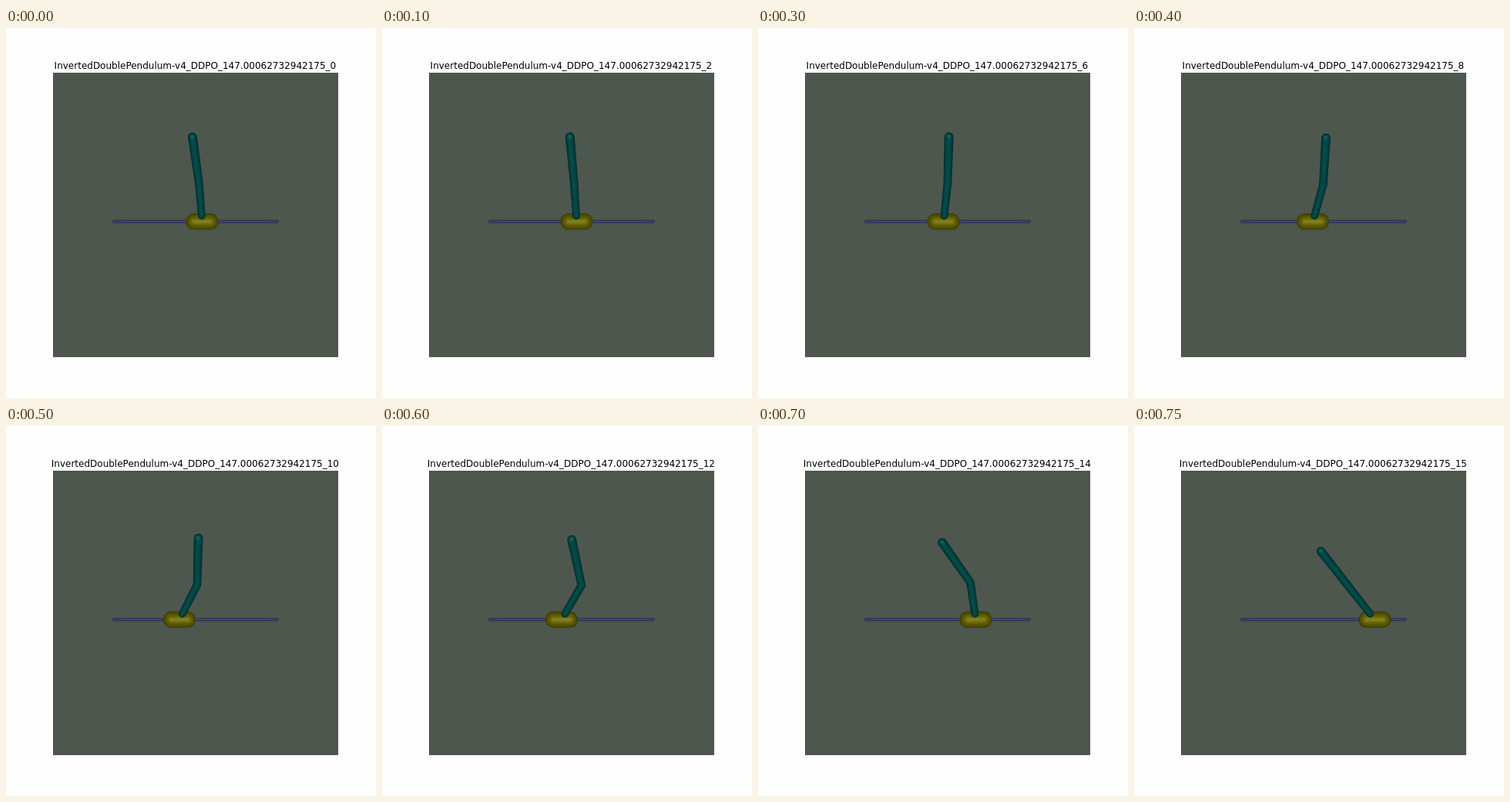
An HTML page with a canvas for the animation above (800 ms loop, 480 by 480 pixels).

```html
<!DOCTYPE html>
<html>
<head>
<meta charset="utf-8">
<style>
  html, body { margin: 0; width: 100%; height: 100%; overflow: hidden; background: #fefefe; }
  canvas { display: block; width: 480px; height: 480px; }
</style>
</head>
<body>
<canvas id="stage" width="480" height="480"></canvas>
<script>
const ctx = document.getElementById('stage').getContext('2d');
const STEP_MS = 50, STEPS = 16;
const POLE = 0.6, POLE_RADIUS = 0.045, CART_RADIUS = 0.1;

// Key poses: step, cart position, lower and upper pole angle from vertical
const POSES = [
  [0, 0.080, -0.070, -0.114],
  [4, 0.024, -0.014, -0.027],
  [8, -0.132, 0.212, 0.048],
  [10, -0.198, 0.367, 0.016],
  [11, -0.208, 0.420, -0.060],
  [12, -0.123, 0.400, -0.183],
  [14, 0.345, -0.157, -0.533],
  [15, 0.627, -0.577, -0.577]
];

// Camera looking down at 45 degrees, 45 degree field of view
function project(x, z) {
  const up = (z - 0.1225) * Math.SQRT1_2;
  const scale = 445.4 / (4.1225 - up);
  return { x: 246 + x * scale, y: 242 - up * scale, scale };
}

function slope(i, k) {
  const secant = j => (POSES[j + 1][k] - POSES[j][k]) / (POSES[j + 1][0] - POSES[j][0]);
  if (i === 0) return secant(0) * 0.5;
  if (i === POSES.length - 1) return secant(i - 1);
  const before = POSES[i][0] - POSES[i - 1][0];
  const after = POSES[i + 1][0] - POSES[i][0];
  return (secant(i - 1) * after + secant(i) * before) / (before + after);
}

// Cubic Hermite interpolation through the key poses
function poseAt(step) {
  let i = 0;
  while (i < POSES.length - 2 && step >= POSES[i + 1][0]) i++;
  const p = POSES[i], q = POSES[i + 1];
  const h = q[0] - p[0], u = (step - p[0]) / h;
  const ease = u * u * (3 - 2 * u);
  return [1, 2, 3].map(k =>
    p[k] + (q[k] - p[k]) * ease +
    h * u * (1 - u) * ((1 - u) * slope(i, k) - u * slope(i + 1, k)));
}

function bar(x1, x2, y, radius, color) {
  ctx.fillStyle = color;
  ctx.beginPath();
  ctx.roundRect(x1 - radius, y - radius, x2 - x1 + 2 * radius, 2 * radius, radius);
  ctx.fill();
}

// Capsule whose radius follows the perspective scale at each end
function capsule(a, b, size, shift) {
  const ra = a.scale * size, rb = b.scale * size;
  const angle = Math.atan2(b.y - a.y, b.x - a.x), quarter = Math.PI / 2;
  ctx.beginPath();
  ctx.arc(a.x - shift, a.y, ra, angle + quarter, angle - quarter);
  ctx.arc(b.x - shift, b.y, rb, angle - quarter, angle + quarter);
  ctx.fill();
}

function drawRail() {
  const left = project(-1, 0), right = project(1, 0);
  bar(left.x, right.x, left.y, 2.1, '#2f2e4c');
  bar(left.x, right.x, left.y, 1.2, '#403e70');
  bar(left.x + 10, right.x - 10, left.y - 0.2, 0.6, '#49477c');
}

function drawCart(x) {
  const c = project(x, 0), half = CART_RADIUS * c.scale;
  const layers = [
    [1, '#3b3b08'], [0.92, '#474700'], [0.8, '#525100'],
    [0.64, '#5c5b00'], [0.46, '#676600'], [0.29, '#73720c'], [0.19, '#7f7e20']
  ];
  for (const [size, color] of layers)
    bar(c.x - half, c.x + half, c.y, half * size, color);
}

function drawPoles(x, lower, upper) {
  const elbowX = x + POLE * Math.sin(lower), elbowZ = POLE * Math.cos(lower);
  const base = project(x + CART_RADIUS * Math.tan(lower), CART_RADIUS);
  const elbow = project(elbowX, elbowZ);
  const tip = project(elbowX + POLE * Math.sin(upper), elbowZ + POLE * Math.cos(upper));
  const layers = [
    [1, 0, '#042b2a'], [0.86, 0.1, '#003735'], [0.68, 0.2, '#00413f'],
    [0.46, 0.3, '#004846'], [0.22, 0.4, '#004e4b']
  ];
  for (const [size, shift, color] of layers) {
    ctx.fillStyle = color;
    capsule(base, elbow, POLE_RADIUS * size, shift);
    capsule(elbow, tip, POLE_RADIUS * size, shift);
  }
  const glow = ctx.createRadialGradient(tip.x - 0.3, tip.y - 0.5, 0, tip.x - 0.3, tip.y - 0.5, 4.2);
  glow.addColorStop(0, 'rgba(28,122,116,0.9)');
  glow.addColorStop(1, 'rgba(0,82,78,0)');
  ctx.fillStyle = glow;
  ctx.fillRect(tip.x - 5, tip.y - 5, 10, 10);
}

function draw(step) {
  ctx.fillStyle = '#fefefe';
  ctx.fillRect(0, 0, 480, 480);
  ctx.fillStyle = '#4e574e';
  ctx.fillRect(61, 58, 370, 369);

  ctx.fillStyle = '#000';
  ctx.font = '12px "DejaVu Sans", sans-serif';
  ctx.textAlign = 'center';
  ctx.fillText('InvertedDoublePendulum-v4_DDPO_147.00062732942175_' + step, 245.4, 53);

  const [cart, lower, upper] = poseAt(step);
  drawRail();
  drawCart(cart);
  drawPoles(cart, lower, upper);
}

const start = performance.now();
function tick() {
  draw(Math.floor((performance.now() - start) / STEP_MS) % STEPS);
  requestAnimationFrame(tick);
}
tick();
</script>
</body>
</html>
```
